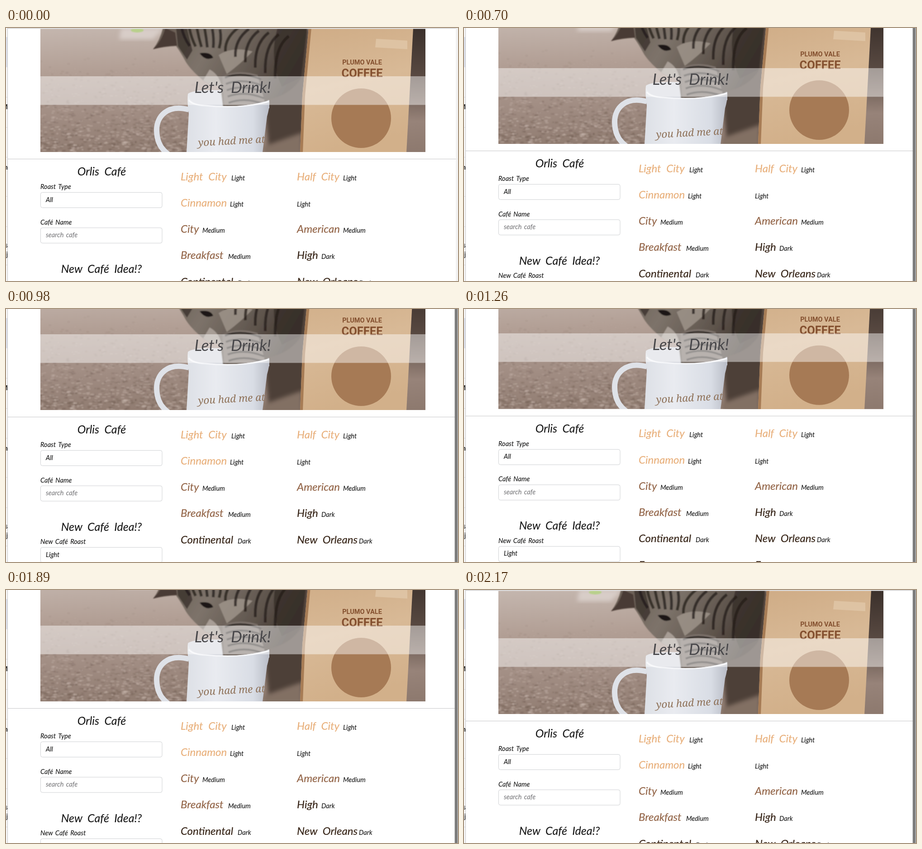
An HTML page that plays this animation: 999x561 px, repeating every 2.24 s.

```html
<!DOCTYPE html>
<html lang="en">
<head>
<meta charset="utf-8">
<title>Café page scroll</title>
<style>
  html, body { margin: 0; width: 100%; height: 100%; overflow: hidden; background: #fff; }
  svg { display: block; width: 100%; height: 100%; }
  text { font-family: Lato, "Open Sans", sans-serif; }
  .hand { font-style: italic; fill: #171717; stroke: #171717; stroke-width: .1; font-size: 14.6px; word-spacing: .14em; }
  .head { font-size: 25px; text-anchor: middle; word-spacing: .22em; }
  .roast { font-size: 24px; word-spacing: .25em; stroke-width: .2; }
  .title { font-size: 35px; fill: #48474a; stroke: none; }
  .hint { fill: #6f6f72; stroke: none; }
  .light { fill: #e8b07c; stroke: #e8b07c; }
  .medium { fill: #936548; stroke: #936548; }
  .dark { fill: #372518; stroke: #372518; }
  .box { fill: #fff; stroke: #cfd1d4; }
  .print { fill: #84502f; font-weight: 700; text-anchor: middle; font-family: Roboto, sans-serif; }
  .mug { fill: #8f7259; font: italic 22.5px "Noto Serif", serif; }
  .edge { font-size: 15px; text-anchor: end; fill: #222; }
</style>
</head>
<body>
<svg viewBox="0 0 999 561" preserveAspectRatio="none">
  <defs>
    <clipPath id="frame"><rect x="76" y="2" width="851" height="273"/></clipPath>
    <clipPath id="strip"><rect width="4" height="561"/></clipPath>
    <linearGradient id="carpet" x1="0" y1="0" x2="0.1" y2="1">
      <stop offset="0" stop-color="#c4b6ae"/><stop offset=".35" stop-color="#b29f95"/>
      <stop offset=".7" stop-color="#a18d83"/><stop offset="1" stop-color="#917d72"/>
    </linearGradient>
    <linearGradient id="fur" x1="0" y1="0" x2="1" y2=".3">
      <stop offset="0" stop-color="#65594f"/><stop offset=".4" stop-color="#7d736a"/>
      <stop offset=".75" stop-color="#5f554d"/><stop offset="1" stop-color="#40362f"/>
    </linearGradient>
    <linearGradient id="china" x1="0" x2="1">
      <stop offset="0" stop-color="#dde0e6"/><stop offset=".35" stop-color="#e9ebf0"/>
      <stop offset=".8" stop-color="#d9dde5"/><stop offset="1" stop-color="#b9bcc6"/>
    </linearGradient>
    <linearGradient id="kraft" x1="0" y1="0" x2=".2" y2="1">
      <stop offset="0" stop-color="#cfac86"/><stop offset=".5" stop-color="#d8b996"/>
      <stop offset="1" stop-color="#d2b08a"/>
    </linearGradient>
    <linearGradient id="corner" x1="0" y1="0" x2="0" y2="1">
      <stop offset="0" stop-color="#3b302b"/><stop offset=".4" stop-color="#594a42"/>
      <stop offset=".75" stop-color="#978379"/><stop offset="1" stop-color="#8d796e"/>
    </linearGradient>
    <filter id="soft" x="-20%" y="-20%" width="140%" height="140%"><feGaussianBlur stdDeviation="5"/></filter>
    <filter id="slight"><feGaussianBlur stdDeviation="1.2"/></filter>
  </defs>

  <g id="page">
    <rect x="4" width="995" height="1.3" fill="#cbcbcd"/>
    <g clip-path="url(#frame)">
      <rect x="76" y="2" width="851" height="273" fill="url(#carpet)"/>
      <g id="pile" filter="url(#slight)"></g>
      <path d="M255 0H350L325 25H250Z" fill="#d8cdc8" filter="url(#soft)"/>
      <ellipse cx="290" cy="5" rx="14" ry="5" fill="#b9d08c" filter="url(#slight)"/>
      <rect x="880" y="0" width="47" height="276" fill="url(#corner)"/>
      <path d="M560 0H672L656 276H582L570 170Z" fill="#4d4039" filter="url(#soft)"/>
      <path d="M570 262L655 232V290H570Z" fill="#826f64" filter="url(#soft)"/>

      <path d="M402 146Q412 136 480 138L582 160V178H404Z" fill="#d6d8df"/>
      <g filter="url(#slight)">
        <path d="M325 47Q340 28 347 0H665L650 115Q625 150 580 158L574 176H480L474 128Q455 130 438 118Q410 95 398 76Q385 52 376 40Q350 41 325 47Z" fill="url(#fur)"/>
        <path d="M325 47Q345 28 352 0L374 10L378 39Q350 40 325 47Z" fill="#4a3b35"/>
        <path d="M376 0H400L412 50L400 70L380 40Z" fill="#3a312c" opacity=".8"/>
        <path d="M478 108Q510 90 556 104L574 172H482Z" fill="#7b716a"/>
        <path d="M470 60Q500 40 545 52Q520 78 488 102Z" fill="#a0968c" opacity=".8"/>
        <path d="M450 92Q470 102 476 128Q452 130 436 116Z" fill="#a79d95"/>
        <path d="M600 0H665L652 110L610 130Q580 70 600 0Z" fill="#352c27" opacity=".75"/>
        <path d="M428 56Q440 74 458 66Q452 52 428 56Z" fill="#1b1715"/>
        <g id="stripes" fill="none" stroke="#231d1a" stroke-width="6" stroke-opacity=".75"></g>
      </g>
      <path d="M404 181C356 168 333 197 333 226C333 258 347 275 374 290" fill="none" stroke="#dfe2e8" stroke-width="12"/>
      <path d="M402 146Q404 168 440 172Q520 180 582 160Q583 176 577 196L567 276H399L404 190Q400 165 402 146Z" fill="url(#china)"/>
      <path d="M404 160Q412 171 440 172Q520 180 581 163" fill="none" stroke="#f5f6f9" stroke-width="3"/>
      <text class="mug" transform="translate(425 262) rotate(-3)">you had me at</text>

      <path d="M669 0H900L885 276H650L655 150Z" fill="url(#kraft)"/>
      <path d="M669 0L655 150L650 276H656L661 150L675 0Z" fill="#a77c55"/>
      <path d="M818 24L887 28V47L816 43Z" fill="#e3cbad" opacity=".7"/>
      <circle cx="785" cy="200" r="66" fill="#a67a55"/>
      <text class="print" x="787" y="81" font-size="14.5">PLUMO VALE</text>
      <text class="print" x="787" y="109" font-size="25.5">COFFEE</text>
      <rect x="76" y="107" width="851" height="63.5" fill="#fff" opacity=".46"/>
    </g>
    <text class="hand head title" x="501" y="144">Let's Drink!</text>
    <rect x="4" y="290" width="995" height="1" fill="#c6c6c8"/>
    <g id="form"></g>
    <g id="menu"></g>
  </g>

  <rect x="994" width="5" height="561" fill="#efefef" opacity=".8"/>
  <rect id="bar" x="991.7" y="-4" width="6.6" height="569" rx="3.3" fill="#7c7c7c"/>
  <g clip-path="url(#strip)" id="behind">
    <rect width="4" height="561" fill="#f7f7f8"/>
    <rect y="20" width="4" height="67" fill="#dde1ec"/>
  </g>
  <rect x="3" width="1" height="561" fill="#c3c3c6"/>
</svg>

<script>
const NS = 'http://www.w3.org/2000/svg';
const get = id => document.getElementById(id);

function add(parent, tag, attrs, label) {
  const el = document.createElementNS(NS, tag);
  for (const k in attrs) el.setAttribute(k, attrs[k]);
  if (label) el.textContent = label;
  parent.appendChild(el);
  return el;
}
const write = (parent, cls, x, y, label) => add(parent, 'text', { class: cls, x, y }, label);

// Carpet pile, coarser towards the viewer
let seed = 7;
const rand = () => (seed = seed * 16807 % 2147483647) / 2147483647;
for (let i = 0; i < 900; i++) {
  const y = 60 + Math.sqrt(rand()) * 215, near = y / 275;
  add(get('pile'), 'ellipse', {
    cx: 76 + rand() * 340, cy: y, rx: 2 + rand() * 4 * near, ry: 1 + rand() * 1.6 * near,
    fill: rand() < .5 ? '#6b574d' : '#d3c4bb', opacity: .35 * near
  });
}

// Tabby markings: forehead, back and foreleg
for (let i = 0; i < 6; i++) {
  add(get('stripes'), 'path', { d: `M${388 + i * 17} ${-2 + i}q4 22 ${18 - i * 4} 42` });
  add(get('stripes'), 'path', { d: `M${515 + i * 22} ${-2 + i * 4}q-32 24 -30 ${54 + i * 8}` });
}
for (let i = 0; i < 5; i++)
  add(get('stripes'), 'path', { d: `M${484 + i * 2} ${110 + i * 14}q38 -14 80 4`, 'stroke-width': 4 });

// Form column
const form = get('form');
function field(y, label, value, hint = '') {
  write(form, 'hand', 76, y, label);
  add(form, 'rect', { class: 'box', x: 76.5, y: y + 7.5, width: 268.5, height: 34, rx: 4 });
  write(form, 'hand ' + hint, 88, y + 28.5, value);
}
write(form, 'hand head', 211.5, 327, 'Orlis Café');
field(357, 'Roast Type', 'All');
field(435.5, 'Café Name', 'search cafe', 'hint');
write(form, 'hand head', 211, 542.5, 'New Café Idea!?');
field(572, 'New Café Roast', 'Light');

// Roast list: name, strength, x of strength
const columns = [
  [386, [['Light City', 'Light', 498], ['Cinnamon', 'Light', 495], ['City', 'Medium', 434],
    ['Breakfast', 'Medium', 491], ['Continental', 'Dark', 512], ['Espresso', 'Dark', 492]]],
  [643, [['Half City', 'Light', 745], ['', 'Light', 643], ['American', 'Medium', 745],
    ['High', 'Dark', 697], ['New Orleans', 'Dark', 780], ['European', 'Dark', 750]]]
];
for (const [x, rows] of columns)
  rows.forEach(([name, strength, sx], i) => {
    const y = 337.5 + i * 58.25;
    write(get('menu'), 'hand roast ' + strength.toLowerCase(), x, y, name);
    write(get('menu'), 'hand', sx, y, strength);
  });

// Window peeking out on the left
const behind = get('behind');
for (const y of [153, 220, 286, 373, 440, 525])
  add(behind, 'rect', { y, width: 4, height: 1, fill: '#dcdce0' });
for (const [c, y, w] of [['M', 180, 700], ['n', 314, 700], ['s', 487, 400], ['j', 507, 400]])
  add(behind, 'text', { class: 'edge', x: 4, y, 'font-weight': w }, c);

// Scroll flick down with a momentum tail, then back up
const STEP = 70, LOOP = 2240;
const keys = [[0, 0], [490, 0], [560, 1], [630, 8], [700, 18], [770, 31], [840, 41], [910, 47.5],
  [980, 51], [1120, 52.7], [1260, 53.2], [1400, 53.5], [1610, 53.5], [1680, 51.5], [1750, 46.5],
  [1820, 38.5], [1890, 28], [1960, 17.5], [2030, 8.5], [2100, 2.5], [2170, 0], [LOOP, 0]];

function scrollAt(t) {
  const i = keys.findIndex(k => k[0] > t);
  const [t0, y0] = keys[i - 1], [t1, y1] = keys[i];
  return y0 + (y1 - y0) * (t - t0) / (t1 - t0);
}
function barAt(t) {
  if (t < 630) return 0;
  return t === 1540 ? .85 : t === 1610 ? .65 : 1;
}
function draw(ms) {
  const t = Math.floor(ms % LOOP / STEP) * STEP;
  get('page').setAttribute('transform', `translate(0 ${-scrollAt(t)})`);
  get('bar').setAttribute('opacity', barAt(t));
}

const start = performance.now();
function tick() {
  draw(performance.now() - start);
  requestAnimationFrame(tick);
}
tick();
</script>
</body>
</html>
```
